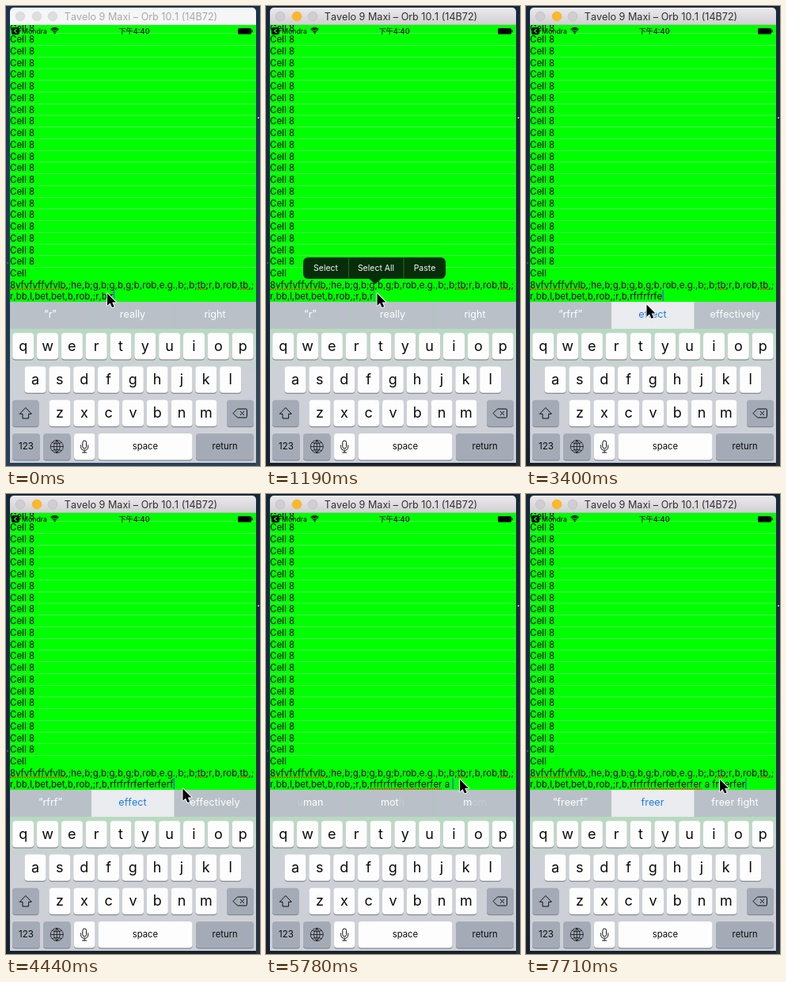
Write an HTML page with a canvas that moves like this. It is 321 by 580 pixels and loops after 8000 ms.

```html
<!DOCTYPE html>
<html lang="en">
<head>
<meta charset="utf-8">
<title>Typing in a cell</title>
<style>
html, body { margin: 0; width: 100%; height: 100%; overflow: hidden; background: #14283f; }
canvas { display: block; width: 321px; height: 580px; }
</style>
</head>
<body>
<canvas id="stage"></canvas>
<script>
const LOOP = 8000, STEP = 148.27, W = 321, H = 580;
const canvas = document.getElementById('stage');
const dpr = window.devicePixelRatio || 1;
canvas.width = W * dpr;
canvas.height = H * dpr;
const c = canvas.getContext('2d');
c.scale(dpr, dpr);
c.fontKerning = 'none';

const FONT = 'Inter, "Noto Sans CJK SC", "Noto Sans CJK", sans-serif';
const LINE = 'r,bb,l,bet,bet,b,rob,;r,b,';
const TYPED = 'rfrfrfrferferferfer a freerfer';

// [step, value...]: each entry holds until the next one
const COUNT = [[0, 1], [12, 2], [15, 3], [16, 4], [17, 5], [18, 6], [19, 7], [21, 8], [23, 9],
  [24, 10], [25, 12], [26, 13], [27, 15], [28, 16], [30, 17], [31, 18], [32, 19], [34, 20],
  [37, 21], [38, 22], [41, 23], [42, 24], [43, 25], [44, 26], [45, 27], [46, 28], [48, 29], [49, 30]];
const CARET = [[0, 1], [2, 0], [8, .4], [9, .8], [10, 1], [39, 1], [51, .3], [52, 1]];
// words, then 1 when the middle one is lit; ~ marks fading letters
const HINTS = [
  [0, '“r”', 'really', 'right', 0],
  [13, '“r~f~”', '~r~', '~ri~', 1],
  [14, '“rf”', 'r~e~d', '~e~ffect', 1],
  [15, '“rf”', 'rd', 'effect', 1],
  [17, '“rf~rf~”', '~eff~ect', 'effect~ive~', 1],
  [18, '“rfrf”', 'effect', 'effectively', 1],
  [34, '~th~e', '~I~', '~an~d', 0],
  [35, 'the', 'I', 'and', 0],
  [38, '~um~', '~mo~', '~m~', 0],
  [39, '~u~man', 'mot~h~', 'm~om~', 0],
  [40, 'man', 'moth', 'mom', 0],
  [42, '“f”', 'few', 'first', 0],
  [44, '“fre~e~”', 'free', 'free~dom~', 1],
  [46, '“free”', 'freer', 'freedom', 1],
  [48, '“freer~f~”', 'freer', 'freer ~fight~', 1],
  [49, '“freerf”', 'freer', 'freer fight', 1]];
const MOUSE = [[0, 127.5, 362], [1, 134, 363.5], [2, 140, 362], [20, 140, 362], [21, 142, 366],
  [23, 152, 376], [25, 172, 388], [28, 219, 376], [29, 223, 371], [30, 223, 371],
  [33, 236, 364], [36, 244.5, 359.5], [54, 244.5, 359.5]];

const held = (track, s) => track.filter(k => k[0] <= s).pop();

function along(track, s) {
  const i = Math.max(1, track.findIndex(k => k[0] >= s));
  const a = track[i - 1], b = track[i], p = (s - a[0]) / (b[0] - a[0]);
  return [1, 2].map(n => a[n] + (b[n] - a[n]) * p);
}

function rect(x, y, w, h, fill) {
  c.fillStyle = fill;
  c.fillRect(x, y, w, h);
}

function round(x, y, w, h, r, fill) {
  c.fillStyle = fill;
  c.beginPath();
  c.roundRect(x, y, w, h, r);
  c.fill();
}

function disc(x, y, r, fill, line) {
  c.beginPath();
  c.arc(x, y, r, 0, 7);
  c.fillStyle = fill;
  c.fill();
  if (line) {
    c.strokeStyle = line;
    c.lineWidth = .6;
    c.stroke();
  }
}

function shade(y0, y1, ...colors) {
  const g = c.createLinearGradient(0, y0, 0, y1);
  colors.forEach((col, i) => g.addColorStop(i / (colors.length - 1), col));
  return g;
}

function setFont(size, weight = 400) {
  c.font = `${weight} ${size}px ${FONT}`;
}

function text(str, x, y, size, fill, align = 'left', weight) {
  setFont(size, weight);
  c.textAlign = align;
  c.fillStyle = fill;
  c.fillText(str, x, y);
}

function icon(d, x, y, color = '#111', fill = false, width = 1) {
  c.save();
  c.translate(x, y);
  const p = new Path2D(d);
  c.lineWidth = width;
  c.lineJoin = 'round';
  c.strokeStyle = c.fillStyle = color;
  fill ? c.fill(p) : c.stroke(p);
  c.restore();
}

function desktop(active) {
  rect(0, 0, W, H, active
    ? shade(0, H, '#14283d', '#152b44', '#15283c', '#17222f')
    : shade(0, H, '#17334f', '#1c3c5c', '#1b3753', '#26415c'));
  rect(316, 0, 5, H, active
    ? shade(0, H, '#14283d', '#172c44', '#202f41', '#27323f')
    : shade(0, H, '#17334f', '#1f3f5f', '#2a425b', '#34495e'));
  disc(319, 141, 1, '#c9d6e4');
  disc(2, 324, .7, '#8fa5bb');
}

function squiggle(x0, x1, y) {
  c.strokeStyle = '#ff2a12';
  c.lineWidth = 1.5;
  c.setLineDash([2, 1]);
  c.beginPath();
  c.moveTo(x0, y);
  c.lineTo(x1, y);
  c.stroke();
  c.setLineDash([]);
}

function cells(s) {
  rect(5, 24, 311, 349, '#00ff00');
  for (let i = 0; i < 21; i++) {
    text('Cell 8', 5, 31.5 + 14.74 * i, 11.5, '#000');
    rect(5, 34.6 + 14.74 * i, 311, .4, '#c8c7cc');
  }
  const top = '8vfvfvffvfvlb,;he,b;g,b;g,b,g;b,rob,e.g.,b;,b;tb;r,b,rob,tb,;';
  const n = held(COUNT, s)[1], end = LINE + TYPED.slice(0, n);
  text('Cell', 5, 341, 11.5, '#000');
  text(top, 5, 355.5, 11.5, '#000');
  text(end, 5, 370, 11.5, '#000');
  const at = str => 5 + c.measureText(str).width;
  squiggle(5, at(top.slice(0, 13)), 357.3);
  for (const from of [top.indexOf('tb;'), top.lastIndexOf('tb')])
    squiggle(at(top.slice(0, from)), at(top.slice(0, from + 2)), 357.3);
  if (n > 19) squiggle(at(LINE), at(LINE + TYPED.slice(0, 19)), 371.8);
  c.globalAlpha = held(CARET, s)[1];
  rect(at(end) + .2, 358, 1.4, 14, '#3d62e8');
  c.globalAlpha = 1;
}

function statusBar() {
  round(7, 27, 10, 9, 2, '#000');
  icon('M2 -2.5L-1 0L2 2.5', 11.5, 31.5, '#0f0', false, 1.2);
  text('Mondra', 20, 34.6, 8.8, '#000');
  c.strokeStyle = '#000';
  c.lineWidth = 1.2;
  for (const r of [3, 5.4]) {
    c.beginPath();
    c.arc(61.5, 35, r, -2.35, -.79);
    c.stroke();
  }
  c.lineWidth = 1.4;
  c.beginPath();
  c.arc(61.5, 35, 7.3, -2.3, -.84);
  c.stroke();
  disc(61.5, 34.2, 1, '#000');
  text('下午4:40', 162, 34.8, 9.2, '#000', 'center', 500);
  round(293, 28, 17.2, 7.6, 1.6, '#000');
  rect(310.6, 30.4, 1.2, 2.8, '#000');
}

function titleBar(active) {
  round(5, 2, 311, 22, [5, 5, 0, 0], active ? shade(2, 24, '#ebe9eb', '#d1cfd1') : '#f6f6f6');
  rect(5, 23.3, 311, .7, active ? '#b3b1b3' : '#dcdcdc');
  const gray = active ? '#d0ced0' : '#dedede', edge = active ? '#b9b7b9' : '#d0d0d0';
  disc(18, 13, 5.8, gray, edge);
  disc(39, 13, 5.8, active ? '#fdb827' : gray, active ? '#eaa923' : edge);
  disc(59, 13, 5.8, gray, edge);
  text('Tavelo 9 Maxi – Orb 10.1 (14B72)', 170.5, 17.8, 12.6, active ? '#303030' : '#a9a9a9', 'center');
}

function menu(s) {
  if (s < 8 || s > 11) return;
  c.globalAlpha = s < 9 ? .96 : 1;
  const dark = '#07260a';
  round(47, 317, 180, 27, 6, dark);
  icon('M-8 0L0 7L8 0Z', 138, 343.8, dark, true);
  rect(104, 317, .8, 27, '#2c7a30');
  rect(173.6, 317, .8, 27, '#2c7a30');
  text('Select', 75.5, 334, 10.5, '#fff', 'center');
  text('Select All', 139, 334, 10.5, '#fff', 'center');
  text('Paste', 200.5, 334, 10.5, '#fff', 'center');
  c.globalAlpha = 1;
}

function hint(str, x, color) {
  setFont(12.6);
  c.textAlign = 'left';
  c.fillStyle = color;
  x -= c.measureText(str.replaceAll('~', '')).width / 2;
  str.split('~').forEach((part, i) => {
    c.globalAlpha = i % 2 ? .18 : 1;
    c.fillText(part, x, 393);
    x += c.measureText(part).width;
  });
  c.globalAlpha = 1;
}

function hints(s) {
  const [, left, mid, right, lit] = held(HINTS, s);
  rect(5, 373, 311, 34, '#b9c0c8');
  rect(107.5, 373, .8, 34, '#a8ccb2');
  rect(212.3, 373, .8, 34, '#a8ccb2');
  if (lit) rect(108, 373, 104.5, 34, '#eaecef');
  hint(left, 56, '#fff');
  hint(mid, 160, lit ? (s === 14 ? '#5aa0ea' : '#1c7be4') : '#fff');
  hint(right, 264, '#fff');
}

function key(x, y, w, label, size = 18, fill = '#fdfdfd') {
  round(x, y + 1, w, 33.5, 4, '#868b92');
  round(x, y, w, 33.3, 4, fill);
  if (label) text(label, x + w / 2, y + (size > 15 ? 22.3 : 20.2), size, '#0a0a0a', 'center');
}

function keyboard() {
  rect(5, 407, 311, 169, '#cdd0d6');
  rect(5, 407, 311, 55, shade(407, 462, '#b7dabf', '#c4d6cb', '#cdd0d6'));
  const rows = [['qwertyuiop', 21.7], ['asdfghjkl', 37], ['zxcvbnm', 68]];
  rows.forEach(([letters, x], r) =>
    [...letters].forEach((ch, i) => key(x + i * 30.83 - 13.5, 412.3 + r * 42.2, 27, ch)));
  const gray = '#a4abb7', y3 = 496.7, y4 = 538.9;
  key(8, y3, 33.5, '', 0, gray);
  key(279, y3, 34, '', 0, gray);
  key(8, y4, 35, '123', 11.5, gray);
  key(47, y4, 34.5, '', 0, gray);
  key(86, y4, 26.5);
  key(116.5, y4, 119, 'space', 11.3);
  key(240, y4, 73, 'return', 11.3, gray);
  icon('M0 -7L7.5 .8H3.8V6.5H-3.8V.8H-7.5Z', 24.8, 513.5);
  icon('M-3.5 -5.5H7.2Q8.5 -5.5 8.5 -4.2V4.2Q8.5 5.5 7.2 5.5H-3.5L-9 0ZM0 -2.5L5 2.5M5 -2.5L0 2.5', 296, 513.5);
  icon('M-8 0A8 8 0 1 1 8 0A8 8 0 1 1 -8 0ZM0 -8V8M-8 0H8M0 -8Q-8 0 0 8M0 -8Q8 0 0 8M-6 -5Q0 -2 6 -5M-6 5Q0 2 6 5',
    64.3, 555.5, '#111', false, .8);
  icon('M-2.4 -5Q-2.4 -7.5 0 -7.5Q2.4 -7.5 2.4 -5V0Q2.4 2.5 0 2.5Q-2.4 2.5 -2.4 0Z' +
    'M-4.6 -2V0Q-4.6 4.7 0 4.7Q4.6 4.7 4.6 0V-2M0 4.7V7.5M-3 7.5H3', 99.2, 555.5);
}

function pointer(s) {
  const [x, y] = along(MOUSE, s);
  const d = 'M0 0V15.2L3.5 12L6 17.6L8.7 16.4L6.2 11H11Z';
  icon(d, x + .5, y + .5, '#fff', false, 1.8);
  icon(d, x + .5, y + .5, '#000', true);
}

function draw(now) {
  const s = Math.min(53, Math.floor((now % LOOP + 12) / STEP));
  const active = s >= 4;
  desktop(active);
  cells(s);
  statusBar();
  titleBar(active);
  menu(s);
  hints(s);
  keyboard();
  pointer(s);
}

const start = performance.now();
function tick() {
  draw(performance.now() - start);
  requestAnimationFrame(tick);
}
tick();
</script>
</body>
</html>
```
